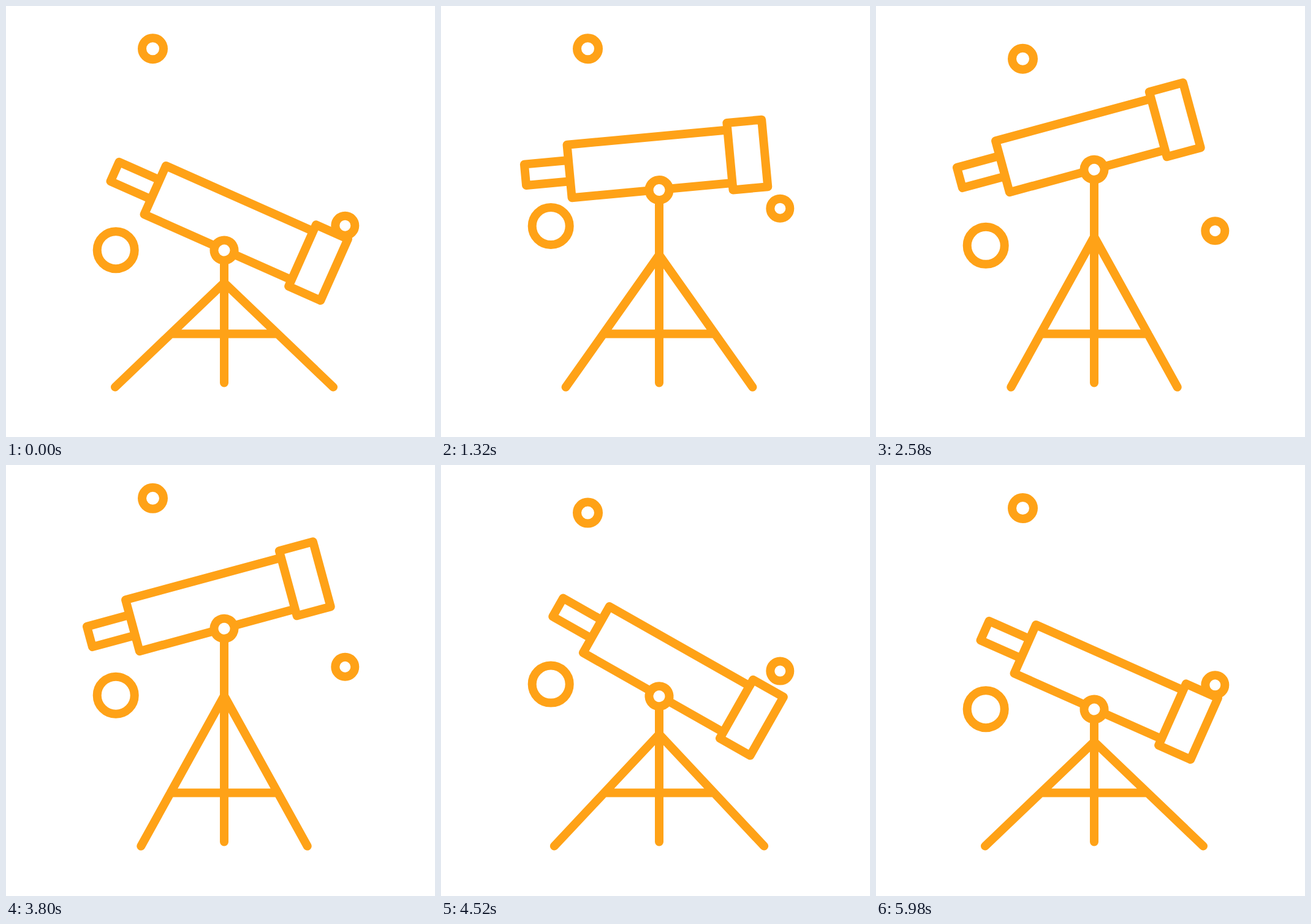
Write an HTML page that moves like this. It is 700x704 px and loops after 6 s.

```html
<!DOCTYPE html>
<html lang="en">
<head>
<meta charset="utf-8">
<title>Telescope</title>
<style>
  html, body { margin: 0; width: 100%; height: 100%; overflow: hidden; background: #fff; }
  svg { display: block; width: 100%; height: 100%; }
  .line { fill: none; stroke: #ffa217; stroke-width: 14; stroke-linecap: round; stroke-linejoin: round; }
  #hub { fill: #fff; }
</style>
</head>
<body>
<svg viewBox="0 0 700 704">
  <path id="stand" class="line"/>
  <g id="scope">
    <path class="line" d="M-143 -62H-215.3V-27.5H-143M120 -87.4H-143V-.5H120M120 -99H177V11H120Z"/>
    <circle id="hub" class="line" r="16.5"/>
  </g>
  <circle class="line planet" cx="239.5" r="17.5"/>
  <circle class="line planet" cx="179.2" r="30.5"/>
  <circle class="line planet" cx="553.3" r="16"/>
</svg>
<script>
const LOOP = 6000, ORBIT = 3000, CX = 356, BAR_Y = 535.5, FOOT_Y = 622.5;
const stand = document.getElementById('stand');
const scope = document.getElementById('scope');
const planets = document.querySelectorAll('.planet');

// Tracks are lists of [time, value], eased between neighbours.
const tilt = [[10, 24], [343, 107], [676, 24], [1104, 24], [1437, -15.2],
              [3800, -15.2], [4800, 38.2], [5133, 107], [5466, 24]];
const lift = [[1104, 0], [1437, 1], [3800, 1], [4800, 0]];
const spread = [[1134, 0], [1467, 1], [3800, 1], [4800, 0]];

// Planet bobbing: [middle, reach, time of lowest point]
const bobs = [[73.5, 20, 2160], [378.4, 20.3, 0], [347.3, 20, 2540]];

const mix = (a, b, p) => a + (b - a) * p;

// Same curve as cubic-bezier(.42, 0, .58, 1)
function ease(x) {
  let lo = 0, hi = 1;
  for (let i = 0; i < 24; i++) {
    const s = (lo + hi) / 2, r = 1 - s;
    if (1.26 * s * r * r + 1.74 * s * s * r + s * s * s < x) lo = s; else hi = s;
  }
  return lo * lo * (3 - 2 * lo);
}

function valueAt(track, t) {
  const i = track.findIndex(key => key[0] > t);
  if (i === 0) return track[0][1];
  if (i < 0) return track[track.length - 1][1];
  const [t0, a] = track[i - 1], [t1, b] = track[i];
  return a === b ? a : mix(a, b, ease((t - t0) / (t1 - t0)));
}

function draw(t) {
  const hubY = mix(399, 267.2, valueAt(lift, t));
  const legs = valueAt(spread, t);
  const apexY = mix(452, 377, legs);
  const foot = mix(178, 135.7, legs);
  const bar = foot * (BAR_Y - apexY) / (FOOT_Y - apexY);

  scope.setAttribute('transform', `translate(${CX} ${hubY}) rotate(${valueAt(tilt, t)})`);
  stand.setAttribute('d',
    `M${CX} ${hubY}V615.5` +
    `M${CX - foot} ${FOOT_Y}L${CX} ${apexY}L${CX + foot} ${FOOT_Y}` +
    `M${CX - bar} ${BAR_Y}H${CX + bar}`);
  bobs.forEach(([mid, reach, low], i) => {
    planets[i].setAttribute('cy', mid + reach * Math.cos(2 * Math.PI * (t - low) / ORBIT));
  });
}

const start = performance.now();
function tick() {
  draw((performance.now() - start) % LOOP);
  requestAnimationFrame(tick);
}
tick();
</script>
</body>
</html>
```
